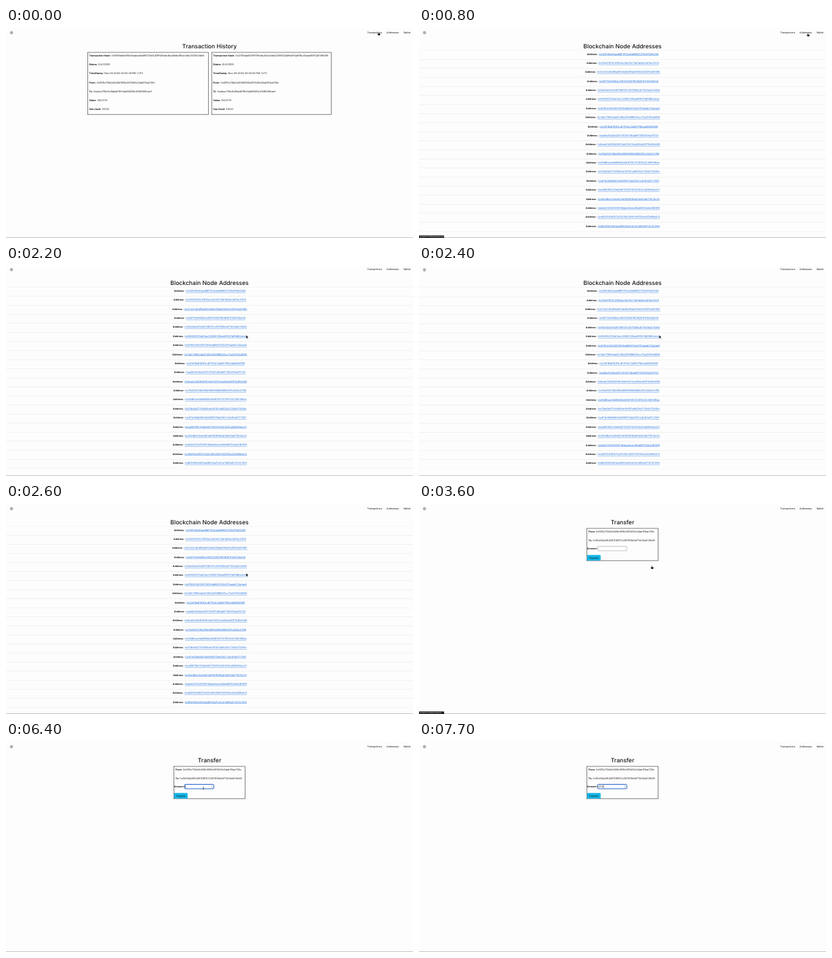
An HTML page that plays this animation: 600x310 px, repeating every 8 s.

```html
<!DOCTYPE html>
<html lang="en">
<head>
<meta charset="utf-8">
<title>Blockchain explorer</title>
<style>
  html, body { margin: 0; width: 100%; height: 100%; overflow: hidden; background: #fdfdfd; }
  svg { display: block; }
  text { font: 3.62px Inter, sans-serif; fill: #161616; text-rendering: geometricPrecision; white-space: pre; }
  .title { font-size: 8.6px; font-weight: 500; text-anchor: middle; }
  .mid { text-anchor: middle; }
  .b { font-weight: 700; }
  .link { fill: #1468dc; text-decoration: underline .35px; text-underline-offset: .4px; }
  .box { fill: none; stroke: #4a4a4a; stroke-width: .7; }
  .status { font-size: 2.9px; fill: #e8e8e8; }
</style>
</head>
<body>
<svg id="stage" width="600" height="310" viewBox="0 0 600 310"></svg>
<script>
const LOOP = 8000;
const FROM = '0xf2f5c73fa04406b1995e397b55c24ab1f3ea726c';
const TO = '0xebec795c9c8bbd61ffc14a6662944748f299cacf';
const HASHES = [
  '0x55f6bd5d6f0d0eabdd4af85131e14d78f14fddc4bed9db4f5dc0d0c393504bb5',
  '0x2787aab92f97f1f9ddc25cb0dd43355632d8fe0f3a878cc5bda58763b739b6f5'
];
const ADDRESSES = `0xf39Fd6e51aad88F6F4ce6aB8827279cffFb92266
0x70997970C51812dc3A010C7d01b50e0d17dc79C8
0x3C44CdDdB6a900fa2b585dd299e03d12FA4293BC
0x90F79bf6EB2c4f870365E785982E1f101E93b906
0x15d34AAf54267DB7D7c367839AAf71A00a2C6A65
0x9965507D1a55bcC2695C58ba16FB37d819B0A4dc
0x976EA74026E726554dB657fA54763abd0C3a0aa9
0x14dC79964da2C08b23698B3D3cc7Ca32193d9955
0x23618e81E3f5cdF7f54C3d65f7FBc0aBf5B21E8f
0xa0Ee7A142d267C1f36714E4a8F75612F20a79720
0xBcd4042DE499D14e55001CcbB24a551F3b954096
0x71bE63f3384f5fb98995898A86B02Fb2426c5788
0xFABB0ac9d68B0B445fB7357272Ff202C5651694a
0x1CBd3b2770909D4e10f157cABC84C7264073C9Ec
0xdF3e18d64BC6A983f673Ab319CCaE4f1a57C7097
0xcd3B766CCDd6AE721141F452C550Ca635964ce71
0x2546BcD3c84621e976D8185a91A922aE77ECEc30
0xbDA5747bFD65F08deb54cb465eB87D40e51B197E
0xdD2FD4581271e230360230F9337D5c0430Bf44C0
0x8626f6940E2eb28930eFb4CeF49B2d1F2C9C1199`.split('\n');

// y is the middle of the capitals
const text = (x, y, body, attrs = '') => `<text x="${x}" y="${y + 1.3}" ${attrs}>${body}</text>`;
const title = body => `<text x="300" y="29.5" class="title">${body}</text>`;
const field = (x, y, name, value) => text(x, y, `<tspan class="b">${name}:</tspan> ${value}`);
const rect = (x, y, w, h, attrs) => `<rect x="${x}" y="${y}" width="${w}" height="${h}" ${attrs}/>`;

const card = (x, w, hash) => rect(x, 36, w, 91.8, 'class="box"') + [
  ['Transaction Hash', hash], ['Status', 'SUCCESS'], ['TimeStamp', 'Nov-06-2022 06:00:09 PM +UTC'],
  ['From', FROM], ['To', TO], ['Value', '250 ETH'], ['Gas Used', '21000']
].map(([name, value], i) => field(x + 2, 41 + 13.08 * i, name, value)).join('');

const addressRow = (address, i) => {
  const y = 38.3 + 13.37 * i;
  return rect(-1, y - 5.4, 602, 13.37, 'fill="none" stroke="#eee" stroke-width=".5"') +
    text(300.4, y, `<tspan class="b">Address : </tspan><tspan class="link">${address}</tspan>`, 'class="mid"');
};

document.getElementById('stage').innerHTML = `
<rect width="600" height="310" fill="#fdfdfd"/>
<g id="page">
  <circle cx="8.1" cy="7" r="2.4" fill="#b0b0b0"/>
  ${text(532.5, 6.2, 'Transactions')}${text(561, 6.2, 'Addresses')}${text(586, 6.2, 'Wallet')}
  <g id="history">${title('Transaction History')}
    ${card(120.5, 177.8, HASHES[0])}${card(303.2, 176.4, HASHES[1])}</g>
  <g id="addresses">${title('Blockchain Node Addresses')}${ADDRESSES.map(addressRow).join('')}</g>
  <g id="transfer">${title('Transfer')}
    ${rect(247.5, 36, 105, 47.8, 'class="box"')}
    ${field(249.8, 41, 'From', FROM)}${field(249.8, 54, 'To', ADDRESSES[4])}
    ${text(247.8, 66, 'Amount:', 'class="b"')}
    ${rect(263.5, 62.5, 42.8, 6.5, 'id="input" rx=".8" fill="#fff"')}
    <path id="spinner" d="M302.9 65.3l.8-1 .8 1M302.9 66.5l.8 1 .8-1" fill="none" stroke="#555" stroke-width=".5"/>
    ${text(264.6, 66, '', 'id="amount"')}
    ${rect(0, 63.5, .45, 4.6, 'id="caret" fill="#222"')}
    ${rect(247.8, 75.2, 20, 8.4, 'rx="1.2" fill="#14b5e6"')}
    ${text(257.8, 79.4, 'Transfer', 'class="mid"')}</g>
</g>
<rect y="309" width="600" height="1" fill="#c4c4c4"/>
<g id="status">${rect(0, 306.3, 37, 3.7, 'rx=".6" fill="#1d1d1d"')}<text id="url" x="1" y="309.2" class="status"></text></g>
<g id="cursor" stroke="#fff" stroke-width=".4" fill="#000">
  <path id="arrow" d="M0 0v5l1.2-1.1.8 1.8.8-.3-.8-1.8h1.6z"/>
  <path id="hand" d="M-.5 0q.5-.6 1 0v1.7l2 .5q.5.2.3 1l-.5 1.8h-2.5l-1.5-2q0-.7.7-.4l.5.4z"/>
  <path id="beam" d="M-.8-1.9q.8 0 .8.5v2.8q0 .5-.8.5M.8-1.9q-.8 0-.8.5v2.8q0 .5.8.5" fill="none" stroke="#222"/>
</g>`;

const el = Object.fromEntries([...document.querySelectorAll('[id]')].map(e => [e.id, e]));
const show = (name, on) => el[name].style.display = on ? '' : 'none';

// [time, ...values], linear in between
const POINTER = [[0, 549, 6], [200, 549, 6.3], [600, 573, 7.6], [1200, 573, 7.6], [2000, 354, 102],
  [3000, 354, 102], [3200, 343, 91], [3700, 343, 91], [4300, 286, 61.5], [4600, 289, 65.5],
  [4900, 289, 65.5], [5200, 256, 75], [5400, 290.5, 67.5], [5900, 290.5, 67.5], [6000, 291, 68]];
const SCROLL = [[2100, 0], [2200, 1.6], [2300, 1.9], [2600, 0], [2800, 1.6], [3000, 0]];

function at(keys, t) {
  const i = keys.findIndex(k => k[0] > t);
  if (i < 0) return keys[keys.length - 1].slice(1);
  if (i === 0) return keys[0].slice(1);
  const a = keys[i - 1], b = keys[i], p = (t - a[0]) / (b[0] - a[0]);
  return a.slice(1).map((v, j) => v + (b[j + 1] - v) * p);
}

function draw(time) {
  const t = Math.floor(time % LOOP / 100) * 100;
  const within = (from, to) => t >= from && t < to;

  show('history', t < 800);
  show('addresses', within(800, 3600));
  show('transfer', t >= 3600);
  el.page.setAttribute('transform', `translate(0 ${-at(SCROLL, t)[0]})`);

  show('status', within(500, 1400) || within(3200, 3800));
  el.url.textContent = 'localhost:3000/' + (t < 2000 ? 'addresses' : 'transfer');

  const focused = t >= 4800;
  el.input.setAttribute('stroke', focused ? '#2463c9' : '#8a8a8a');
  el.input.setAttribute('stroke-width', focused ? 1 : .5);
  show('spinner', t >= 4700);
  el.amount.textContent = '1212'.slice(0, [6700, 7000, 7500, 7700].filter(k => t >= k).length);
  el.caret.setAttribute('x', 264.5 + el.amount.getComputedTextLength());
  show('caret', within(5300, 5800) || t >= 6400);

  const hand = t < 1300 || within(3200, 3800);
  const beam = within(4600, 5000) || t >= 5400;
  show('hand', hand);
  show('beam', beam);
  show('arrow', !hand && !beam);
  show('cursor', t < 6700);
  el.cursor.setAttribute('transform', `translate(${at(POINTER, t)})`);
}

function tick() {
  draw(performance.now());
  requestAnimationFrame(tick);
}
tick();
</script>
</body>
</html>
```
